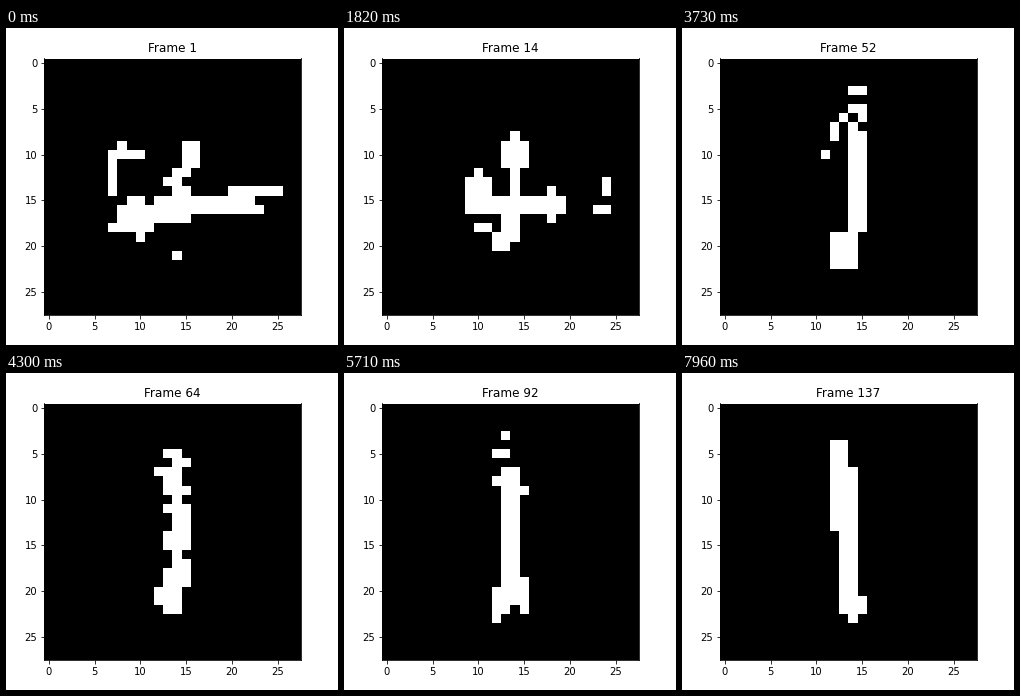
These frames come from a looping animation (332x317 px, 8 s). A matplotlib script:

```python
import numpy as np
import matplotlib.pyplot as plt
from matplotlib.animation import FuncAnimation

WIDTH, HEIGHT, DPI = 332, 317, 72
LEFT, TOP, SIDE = 38.25, 30.5, 256.4
GRID = 28
INTERVAL = 50
TICKS = 160
HOLD = 24  # ticks spent on the opening picture

plt.rcParams["font.family"] = "DejaVu Sans"
Y, X = np.mgrid[:GRID, :GRID]


def stroke(radius, *points):
    """Cells whose centre lies within radius of a polyline (or single point)."""
    cells = np.zeros((GRID, GRID), bool)
    for (x0, y0), (x1, y1) in zip(points, points[1:] or points):
        dx, dy = x1 - x0, y1 - y0
        along = ((X - x0) * dx + (Y - y0) * dy) / max(dx * dx + dy * dy, 1e-9)
        along = np.clip(along, 0, 1)
        cells |= np.hypot(X - x0 - along * dx, Y - y0 - along * dy) <= radius
    return cells


def thin(*points):
    return stroke(0.5, *points)


def wide(*points):
    return stroke(0.6, *points)


def lying_figure():
    neck = wide((15.5, 9), (15.5, 11), (13.5, 13), (14.5, 14))
    arm = thin((8, 9), (8, 10), (10, 10), (7, 10), (7, 14))
    body = stroke(1.6, (9, 16.5), (10, 16.5)) | stroke(1.13, (12, 16), (22, 15.6))
    tip = wide((20, 14), (25, 14))
    base = thin((7, 18), (11, 18)) | thin((10, 19)) | thin((14, 21))
    return neck | arm | body | tip | base


def cross_figure():
    head = stroke(1.1, (14, 9), (14, 11)) | thin((14, 12), (14, 19))
    lobe = stroke(1.2, (10, 13), (10, 15)) | thin((9, 16), (12, 16))
    beam = wide((12, 15.5), (19, 15.5)) | thin((18, 14), (18, 17))
    foot = wide((13.5, 17), (12.5, 20)) | thin((10, 18), (11, 18), (12, 19))
    stray = thin((24, 13), (24, 14)) | thin((23, 16), (24, 16))
    return head | lobe | beam | foot | stray


def hook():
    stem = thin((15, 6), (15, 8)) | wide((14.5, 8), (14.5, 15), (13.5, 17), (12.5, 19))
    return stem | thin((10, 15), (13, 15)) | thin((12, 20)) | thin((20, 13))


def flagged_one():
    stem = wide((14.5, 8), (14.5, 18)) | stroke(1.45, (13, 20), (13, 21))
    flag = thin((12, 8), (12, 7), (14, 5), (15, 5), (15, 6), (14, 7))
    return stem | flag | thin((14, 3), (15, 3)) | thin((11, 10))


STEM = wide((13.5, 7), (13.5, 22))
CROWN = thin((13, 3)) | thin((12, 5), (13, 5))
SHOULDER = thin((12, 7), (12, 8))
FOOT = thin((12, 20), (12, 22))


def notched_one():
    notches = (X == 15) & (Y > 8) & (Y < 22) & (Y % 6 < 4)
    return STEM | CROWN | SHOULDER | FOOT | notches | thin((12, 23))


def dotted_one():
    return STEM | CROWN | SHOULDER | FOOT | thin((13, 6)) | thin((12, 22), (15, 22))


def slanted_one():
    return STEM | wide((12.5, 4), (12.5, 13)) | thin((15, 21), (15, 22), (14, 23))


POSES = {1: lying_figure(), 14: cross_figure(), 35: hook(), 52: flagged_one(),
         75: notched_one(), 111: dotted_one(), 137: slanted_one()}
STEPS = list(POSES)


def neighbour_mean(grid):
    total = sum(np.roll(grid, (dy, dx), (0, 1))
                for dy in (-1, 0, 1) for dx in (-1, 0, 1))
    return (total - grid) / 8


def sample(step):
    """Noisy cell-by-cell drift from one pose to the next."""
    if step in POSES:
        return POSES[step]
    i = np.searchsorted(STEPS, step) - 1
    start, end = STEPS[i], STEPS[i + 1]
    t = (step - start) / (end - start)
    blend = (1 - t) * POSES[start] + t * POSES[end]
    score = 0.7 * blend + 0.3 * neighbour_mean(blend)
    switch = np.random.default_rng(100 + i).uniform(-0.3, 0.3, blend.shape)
    flicker = np.random.default_rng(1000 + step).normal(0, 0.12, blend.shape)
    return score > np.maximum(0.5 + switch + flicker, 0.05)


fig = plt.figure(figsize=(WIDTH / DPI, HEIGHT / DPI), dpi=DPI, facecolor="white")
ax = fig.add_axes([LEFT / WIDTH, 1 - (TOP + SIDE) / HEIGHT,
                   SIDE / WIDTH, SIDE / HEIGHT])
image = ax.imshow(sample(1).astype(float), cmap="gray", vmin=0, vmax=1,
                  interpolation="nearest", aspect="auto")
ax.set_xticks(range(0, GRID, 5))
ax.set_yticks(range(0, GRID, 5))
ax.tick_params(labelsize=10)
title = ax.set_title("Frame 1", fontsize=12, pad=6)


def update(tick):
    step = max(1, tick - HOLD + 2)
    image.set_data(sample(step).astype(float))
    title.set_text(f"Frame {step}")
    return image, title


anim = FuncAnimation(fig, update, frames=TICKS, interval=INTERVAL,
                     repeat=True, repeat_delay=0, blit=False)
plt.show()
```
